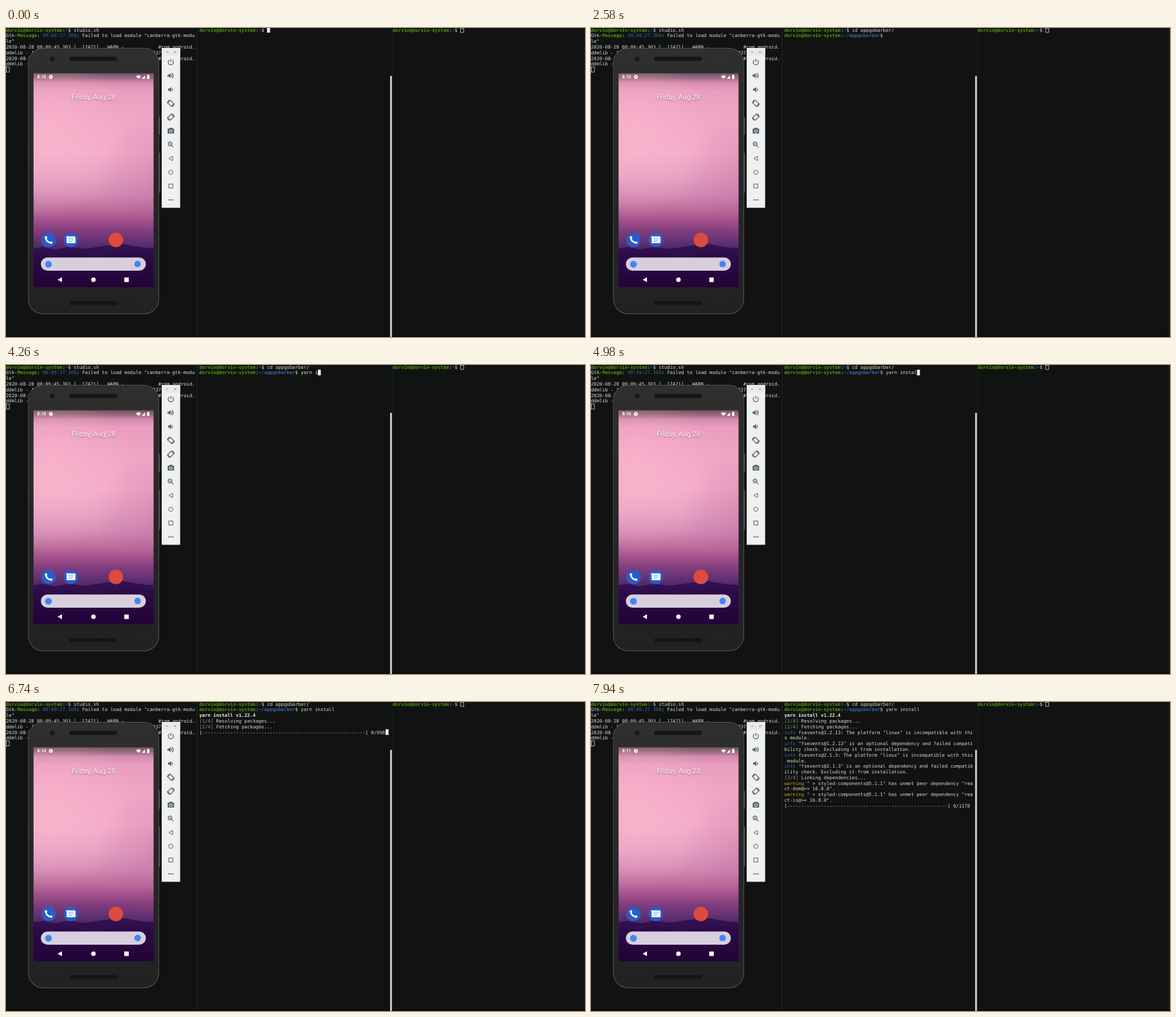
Animation of 900x480 px, one loop 8 s. Source, as an HTML page with a canvas:

```html
<!DOCTYPE html>
<html lang="en">
<head>
<meta charset="utf-8">
<title>Terminal and emulator</title>
<style>
html, body { margin: 0; width: 100%; height: 100%; overflow: hidden; background: #111312; }
canvas { display: block; width: 900px; height: 480px; }
</style>
</head>
<body>
<canvas id="stage"></canvas>
<script>
const LOOP = 8000;
const CELL = 4.386, ROW = 8.78, COLS = 67;
const PANES = [0, 300.5, 601];
const BG = '#111312', WHITE = '#d6dad4', GREEN = '#4e9a06', BLUE = '#3465a4',
      GREY = '#8a8d88', YELLOW = '#c4a000', ICON = '#4f6672';
const USER = 'dorvin', HOST = 'dorvin-system';

const canvas = document.getElementById('stage');
const ctx = canvas.getContext('2d');
const dpr = window.devicePixelRatio || 1;
canvas.width = 900 * dpr;
canvas.height = 480 * dpr;

// ---------- shape helpers ----------
function rounded(x, y, w, h, r, fill) {
  ctx.beginPath();
  ctx.roundRect(x, y, w, h, r);
  ctx.fillStyle = fill;
  ctx.fill();
}

function disc(x, y, r, fill) {
  ctx.beginPath();
  ctx.arc(x, y, r, 0, Math.PI * 2);
  ctx.fillStyle = fill;
  ctx.fill();
}

function box(x, y, w, h, fill) {
  ctx.fillStyle = fill;
  ctx.fillRect(x, y, w, h);
}

function poly(points, fill) {
  ctx.beginPath();
  points.forEach(([x, y]) => ctx.lineTo(x, y));
  ctx.closePath();
  if (fill) { ctx.fillStyle = fill; ctx.fill(); } else ctx.stroke();
}

function arc(x, y, r, from, to) {
  ctx.beginPath();
  ctx.arc(x, y, r, from, to);
  ctx.stroke();
}

function line(x1, y1, x2, y2) {
  ctx.beginPath();
  ctx.moveTo(x1, y1);
  ctx.lineTo(x2, y2);
  ctx.stroke();
}

function fade(x1, y1, x2, y2, stops) {
  const g = ctx.createLinearGradient(x1, y1, x2, y2);
  stops.forEach(([at, color]) => g.addColorStop(at, color));
  return g;
}

// ---------- terminal ----------
const rowTop = row => row * ROW - 1.5;

function put(pane, row, col, text, color = WHITE, bold = false) {
  ctx.font = `${bold ? 'bold ' : ''}7.285px "DejaVu Sans Mono", monospace`;
  ctx.fillStyle = color;
  ctx.fillText(text, PANES[pane] + col * CELL, row * ROW + 5.7);
  return col + text.length;
}

function prompt(pane, row, path, command = '') {
  let col = put(pane, row, 0, `${USER}@${HOST}`, GREEN, true);
  col = put(pane, row, col, ':');
  col = put(pane, row, col, path, BLUE, true);
  return put(pane, row, col, '$ ' + command);
}

function cursor(pane, row, col, hollow) {
  const x = PANES[pane] + col * CELL, y = Math.max(rowTop(row), 0);
  const h = rowTop(row + 1) - y;
  if (!hollow) return box(x, y, CELL + 0.3, h, '#eeeeec');
  ctx.strokeStyle = '#c8cbc6';
  ctx.lineWidth = 0.8;
  ctx.strokeRect(x + 0.4, y + 0.4, CELL + 0.4, h - 0.8);
}

function leftPane() {
  prompt(0, 0, '~', 'studio.sh');
  let col = put(0, 1, 0, 'Gtk-');
  col = put(0, 1, col, 'Message', GREEN, true);
  col = put(0, 1, col, ': ');
  col = put(0, 1, col, '08:09:27.308', BLUE);
  put(0, 1, col, ': Failed to load module "canberra-gtk-modu');
  put(0, 2, 0, 'le"');
  [3, 5].forEach(row => {
    put(0, row, 0, '2020-08-28 08:09:45.303 [  17421]   WARN -');
    put(0, row, 54, '#com.android.');
    put(0, row + 1, 0, 'ddmlib - 1');
  });
  put(0, 4, 52, '037');
  cursor(0, 7, 0, true);
}

// Each entry: [time, text on the line so far]
const CD = [[580, 'c'], [740, 'cd'], [900, 'cd '], [1060, 'cd a'], [1380, 'cd ap'],
            [1540, 'cd app'], [1780, 'cd appgobarber/']];
const YARN = [[3140, 'y'], [3300, 'ya'], [3460, 'yar'], [3620, 'yarn'], [3780, 'yarn '],
              [4180, 'yarn i'], [4420, 'yarn in'], [4580, 'yarn ins'], [4740, 'yarn inst'],
              [4820, 'yarn insta'], [4900, 'yarn instal'], [5060, 'yarn install']];
const HIDDEN = [[2500, 3060], [5460, 5780], [7860, 8000]];
const ENTER_CD = 2260, ENTER_YARN = 5940, FETCH = 6660, FETCHED = 7620, LINK = 7860;

// Each entry: [time, prefix, prefix colour, rest]
const skipped = v => [
  [FETCHED, 'info', BLUE, ` fsevents@${v}: The platform "linux" is incompatible with this module.`],
  [FETCHED, 'info', BLUE, ` "fsevents@${v}" is an optional dependency and failed compatibility check. Excluding it from installation.`]
];
const unmet = name =>
  [7780, 'warning', YELLOW, ` " > styled-components@5.1.1" has unmet peer dependency "${name}@>= 16.8.0".`];
const LOG = [
  [6180, 'yarn install v1.22.4', '#eeeeec', ''],
  [6260, '[1/4]', GREY, ' Resolving packages...'],
  [FETCH, '[2/4]', GREY, ' Fetching packages...'],
  ...skipped('1.2.13'), ...skipped('2.1.3'),
  [7700, '[3/4]', GREY, ' Linking dependencies...'],
  unmet('react-dom'), unmet('react-is')
];

const typed = (keys, t) => keys.reduce((text, [at, s]) => t >= at ? s : text, '');

function progress(row, done, total) {
  const count = ` ${done}/${total}`;
  const width = COLS - count.length - 3;
  const full = Math.round(width * done / total);
  return put(1, row, 0, `[${'#'.repeat(full)}${'-'.repeat(width - full)}]${count}`);
}

function middlePane(t) {
  let row = 0, col = prompt(1, 0, '~', typed(CD, t));
  if (t >= ENTER_CD) {
    row = 1;
    col = prompt(1, row, '~/appgobarber', typed(YARN, t));
  }
  if (t >= ENTER_YARN) {
    row = 2;
    col = 0;
    for (const [at, head, color, rest] of LOG) {
      if (t < at) break;
      const text = head + rest;
      put(1, row, 0, head, color, !rest);
      put(1, row, head.length, text.slice(head.length, COLS));
      for (let i = COLS; i < text.length; i += COLS) put(1, ++row, 0, text.slice(i, i + COLS));
      row++;
    }
    if (t >= FETCH && t < FETCHED) {
      const k = Math.min(1, Math.max(0, (t - 6800) / 780));
      col = progress(row, Math.round(998 * k), 998);
    }
    if (t >= LINK) col = progress(row, 0, 1178);
  }
  if (!HIDDEN.some(([from, to]) => t >= from && t < to)) cursor(1, row, col);
}

function terminals(t) {
  box(0, 0, 900, 480, BG);
  box(296.5, 0, 1, 480, '#252827');
  box(600.5, 0, 0.8, 480, '#1d201f');
  box(898, 0, 1, 480, '#1c1f1e');
  box(0, 478.5, 900, 1.5, '#0a0609');
  leftPane();
  middlePane(t);
  prompt(2, 0, '~');
  cursor(2, 0, 24, true);
  rounded(597, 74, 3, 408, 1.5, '#c3c5c4');
}

// ---------- phone ----------
const SCREEN = { x: 42.6, y: 70.3, w: 187, h: 332.5 };

function glow(x, y, r, color, alpha) {
  const g = ctx.createRadialGradient(x, y, 0, x, y, r);
  g.addColorStop(0, `rgba(${color},${alpha})`);
  g.addColorStop(1, `rgba(${color},0)`);
  ctx.fillStyle = g;
  ctx.fillRect(SCREEN.x, SCREEN.y, SCREEN.w, SCREEN.h);
}

function wallpaper() {
  const { x, y, w, h } = SCREEN, right = x + w, bottom = y + h;
  const sky = [[70, '#765566'], [77, '#96687f'], [85, '#d58cad'], [97, '#e99dbf'],
    [135, '#f0a5c5'], [195, '#f2abc9'], [232, '#e59fc2'], [260, '#d38bb4'], [284, '#bb6b9c'],
    [300, '#a04f89'], [316, '#7f3c7c'], [331, '#643272'], [345, '#4a2564'], [403, '#331648']];
  ctx.save();
  ctx.beginPath();
  ctx.rect(x, y, w, h);
  ctx.clip();
  box(x, y, w, h, fade(0, 70, 0, 403, sky.map(([at, c]) => [(at - 70) / 333, c])));
  glow(70, 165, 125, '255,190,208', 0.5);
  glow(245, 235, 105, '165,85,140', 0.3);
  poly([[x, 342], [58, 340], [75, 344], [98, 340], [122, 343], [150, 339], [180, 335],
        [200, 339], [215, 341], [right, 342], [right, bottom], [x, bottom]],
    fade(0, 335, 0, 403, [[0, '#331253'], [0.35, '#2c0d4a'], [1, '#22053a']]));
  poly([[x, 349], [70, 355], [105, 350], [135, 358], [170, 351], [200, 347], [right, 352],
        [right, bottom], [x, bottom]],
    fade(0, 346, 0, 403, [[0, '#2c0c4b'], [0.5, '#280842'], [1, '#210336']]));
  ctx.restore();
}

function statusBar(t) {
  ctx.fillStyle = '#fff';
  ctx.font = 'bold 6.9px Roboto, sans-serif';
  ctx.fillText(t < 7700 ? '8:10' : '8:11', 48.5, 78.4);
  ctx.strokeStyle = '#fff';
  ctx.lineWidth = 1.7;
  arc(69.7, 76, 1.9, 0, Math.PI * 2);
  ctx.lineWidth = 1;
  for (let i = 0; i < 8; i++) {
    const a = i * Math.PI / 4, c = Math.cos(a), s = Math.sin(a);
    line(69.7 + 2 * c, 76 + 2 * s, 69.7 + 3.2 * c, 76 + 3.2 * s);
  }
  ctx.beginPath();
  ctx.moveTo(206, 79);
  ctx.arc(206, 79, 5.4, -Math.PI * 0.76, -Math.PI * 0.24);
  ctx.fillStyle = '#fff';
  ctx.fill();
  poly([[211, 79], [216, 79], [216, 73.5]], '#fff');
  rounded(219.2, 73.3, 3.8, 5.9, 0.6, '#fff');
  box(220.3, 72.6, 1.6, 1, '#fff');
}

function launcher() {
  ctx.save();
  ctx.shadowColor = 'rgba(60,20,50,.6)';
  ctx.shadowBlur = 2 * dpr;
  ctx.shadowOffsetY = 0.7 * dpr;
  ctx.font = '10.9px Roboto, sans-serif';
  ctx.textAlign = 'center';
  ctx.fillStyle = '#fff';
  ctx.fillText('Friday, Aug 28', 136, 111.2);
  ctx.restore();

  disc(66.3, 329.3, 11.3, '#2a5bc9');
  ctx.strokeStyle = '#fff';
  ctx.lineWidth = 2.5;
  ctx.beginPath();
  ctx.moveTo(61.6, 324.6);
  ctx.quadraticCurveTo(62.4, 333.2, 71, 334);
  ctx.stroke();
  ctx.lineWidth = 3.2;
  line(61.8, 323.6, 62.7, 327.2);
  line(68.4, 332.9, 72, 333.8);

  disc(100.7, 329.3, 11.3, '#2a5bc9');
  rounded(94.2, 323.8, 13.8, 10.4, 1.3, '#fff');
  poly([[92.6, 323.8], [97, 323.8], [97, 328]], '#fff');
  [326.5, 329, 331.5].forEach((y, i) => box(97, y - 0.4, i === 2 ? 6 : 8.3, 0.9, '#7b9be0'));

  disc(170.8, 329.3, 11.3, '#dd4b3e');
  rounded(54.2, 356.6, 163.2, 20.4, 10.2, '#d8cfdc');
  disc(66, 367, 5.3, '#4285f4');
  disc(204.6, 366.6, 5, '#4285f4');

  poly([[80.2, 391], [87, 387.2], [87, 394.8]], '#fff');
  disc(135.9, 391, 3.5, '#fff');
  box(183.8, 387.6, 7, 7, '#fff');
}

function phone(t) {
  rounded(236.2, 138, 3.2, 28, 1, '#4a4b4c');
  rounded(236.2, 194, 3.2, 62, 1, '#4a4b4c');
  rounded(34.5, 31, 203.3, 413.5, 23, '#5e5f60');
  rounded(35.5, 32, 201.3, 411.5, 22, '#1b1b1c');
  rounded(36.3, 32.8, 199.7, 409.9, 21,
    fade(0, 33, 0, 443, [[0, '#2f2f30'], [0.5, '#262627'], [1, '#222223']]));
  disc(72, 48, 4, '#1f2021');
  disc(72, 48, 2.4, '#141516');
  rounded(98.5, 44.8, 74, 6.4, 2, '#161617');
  rounded(98.5, 424.2, 74, 6.4, 2, '#141415');
  wallpaper();
  statusBar(t);
  launcher();
}

// ---------- emulator tool strip ----------
function speaker(y, loud) {
  const x = loud ? 255 : 256;
  poly([[x - 4, y - 1.6], [x - 2, y - 1.6], [x + 0.8, y - 4], [x + 0.8, y + 4],
        [x - 2, y + 1.6], [x - 4, y + 1.6]], ICON);
  arc(x + 0.7, y, 2.1, -1.1, 1.1);
  if (loud) arc(x + 0.7, y, 4.4, -1.1, 1.1);
}

// Tilted screen with a short turning arc at two opposite corners
function rotate(y, side) {
  ctx.save();
  ctx.translate(256.2, y);
  ctx.scale(side, 1);
  arc(0, 0, 5.2, Math.PI, Math.PI * 1.4);
  arc(0, 0, 5.2, 0, Math.PI * 0.4);
  ctx.rotate(Math.PI / 4);
  ctx.strokeRect(-3.9, -2.9, 7.8, 5.8);
  ctx.restore();
}

function toolStrip() {
  box(242, 31, 28.7, 248.3, '#f0f0f0');
  box(242, 31, 28.7, 12, '#e9e9ea');
  ctx.strokeStyle = '#77797b';
  ctx.lineWidth = 0.8;
  line(248.8, 37.5, 252, 37.5);
  line(261.2, 36, 264.2, 39);
  line(264.2, 36, 261.2, 39);

  ctx.strokeStyle = ICON;
  ctx.lineWidth = 1.2;
  arc(256.2, 53, 4.1, -0.9, Math.PI + 0.9);
  line(256.2, 47.8, 256.2, 53);
  speaker(74, true);
  speaker(95.7, false);
  rotate(117, 1);
  rotate(138.5, -1);

  rounded(251.3, 156.3, 10, 7.8, 1, ICON);
  box(254, 155, 4.6, 2, ICON);
  disc(256.3, 160.2, 2.5, '#f0f0f0');
  disc(256.3, 160.2, 1.6, ICON);

  arc(255, 180, 2.9, 0, Math.PI * 2);
  line(257.2, 182.2, 260.3, 185.3);
  ctx.lineWidth = 0.7;
  line(253.6, 180, 256.4, 180);
  line(255, 178.6, 255, 181.4);

  ctx.lineWidth = 1;
  poly([[253, 202.7], [259, 199.3], [259, 206.1]]);
  arc(256.2, 224.1, 3.3, 0, Math.PI * 2);
  ctx.strokeRect(253.1, 242.4, 6.2, 6.2);
  [-3, 0, 3].forEach(dx => disc(256.3 + dx, 267, 1.1, ICON));
}

// ---------- loop ----------
function draw(t) {
  ctx.setTransform(dpr, 0, 0, dpr, 0, 0);
  ctx.textRendering = 'geometricPrecision';
  terminals(t);
  phone(t);
  toolStrip();
}

const start = performance.now();
function tick() {
  draw((performance.now() - start) % LOOP);
  requestAnimationFrame(tick);
}
tick();
</script>
</body>
</html>
```
